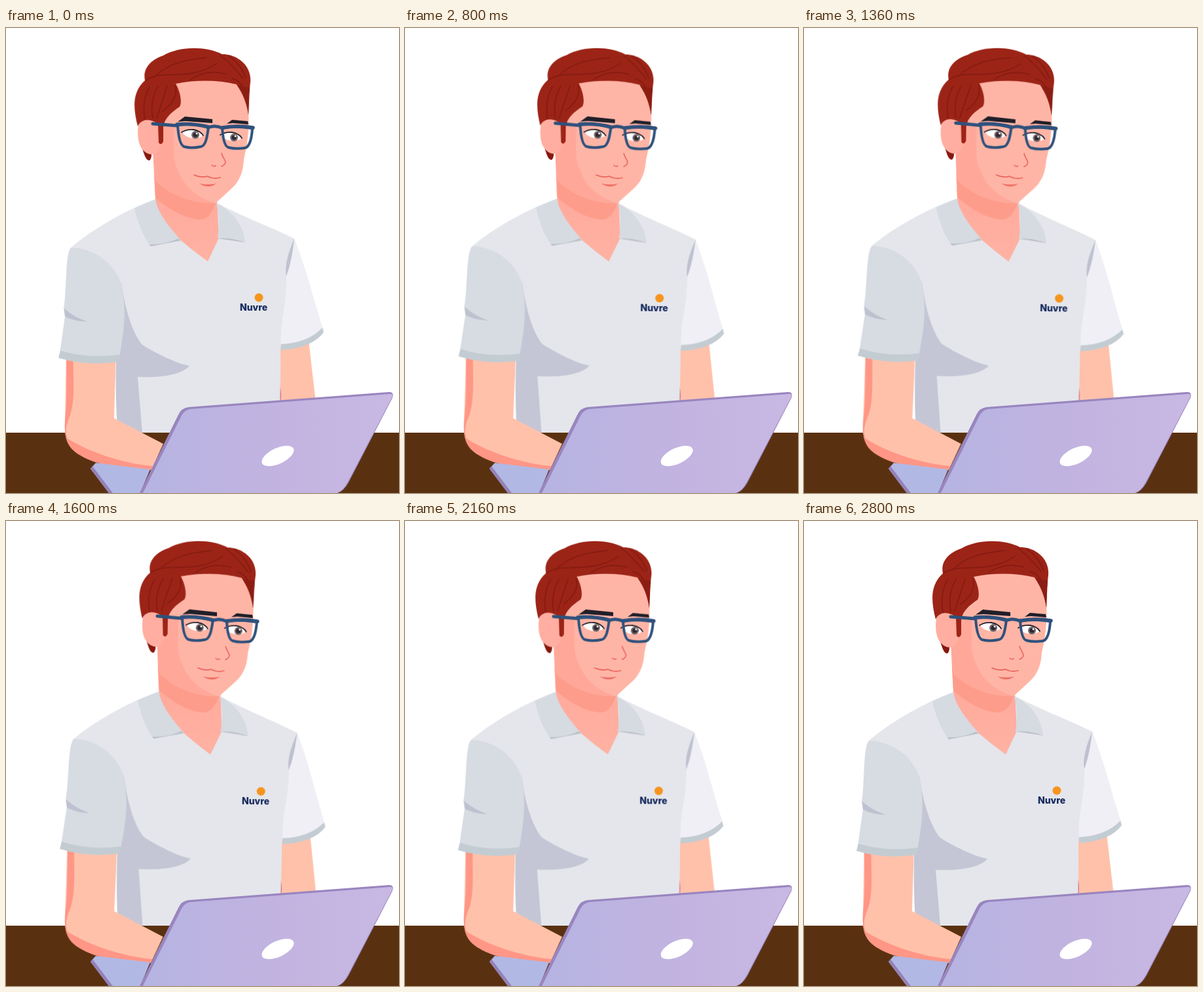
These frames come from a looping animation (600x709 px, 2880 ms). An HTML page without scripts:

```html
<!DOCTYPE html>
<html lang="pt">
<head>
<meta charset="utf-8">
<title>Working at a laptop</title>
<style>
  html, body { margin: 0; width: 100%; height: 100%; overflow: hidden; background: #fff; }
  svg { display: block; width: 100vw; height: 100vh; }
  .sway, .arm {
    transform-box: view-box;
    animation: lean 1440ms cubic-bezier(.37, 0, .63, 1) -120ms infinite alternate;
  }
  .sway { transform-origin: 300px 640px; }
  .arm { transform-origin: 130px 617px; animation-name: follow; }
  @keyframes lean { to { transform: rotate(.9deg); } }
  @keyframes follow { to { transform: skewX(-.9deg); } }
  .line { fill: none; stroke-linecap: round; stroke-linejoin: round; }
  .cuff { fill: #c3ccd2; }
  .fold { fill: #bfc1d0; }
  .collar { fill: #d6dae1; }
  .brand { font: 800 14px Inter, sans-serif; fill: #14275c; }
</style>
</head>
<body>
<svg viewBox="0 0 600 709">
  <defs>
    <linearGradient id="lidTone">
      <stop offset="0" stop-color="#b6b4e2"/>
      <stop offset=".55" stop-color="#c2b3e0"/>
      <stop offset="1" stop-color="#c8b8e3"/>
    </linearGradient>
    <linearGradient id="neckTone" x1="0" y1="0" x2="0" y2="1">
      <stop offset="0" stop-color="#ffa497"/>
      <stop offset="1" stop-color="#ffb2a3"/>
    </linearGradient>
    <g id="eye">
      <path d="M-16-4Q-9-9 1-8Q12-6 16 1Q9 6 0 5Q-11 4-16-4Z" fill="#fff"/>
      <circle cx="4" r="6" fill="#75696d"/>
      <circle cx="4" r="3.6" fill="#2e272d"/>
      <circle cx="6" cy="-2" r="1.4" fill="#fff"/>
      <path class="line" d="M-17-4Q-9-9 1-8Q12-6 16 1" stroke="#272029" stroke-width="1.8"/>
    </g>
  </defs>

  <g class="sway">
    <!-- right forearm -->
    <path d="M419 480L462 476L474 580H418Z" fill="#ffc1aa"/>
    <path d="M418 545Q422 558 418 580H416Z" fill="#d4708f"/>

    <!-- shirt -->
    <path d="M228 261C190 274 132 306 99 335L176 400L168 510L172 640H418L419 490L430 400L440 321C410 306 360 287 320 266Z" fill="#e4e6eb"/>
    <path d="M176 388C182 430 193 465 208 483C229 496 259 511 280 515C271 527 240 534 201 532L210 640H172C168 590 167 545 168 505Z" fill="#c5c6d5"/>
    <path d="M440 321C461 374 469 414 485 461Q463 485 420 486C417 452 429 420 428 378Q429 346 440 321Z" fill="#efeff5"/>
    <path class="fold" d="M440 321C430 344 425 364 428 378C434 362 438 341 440 321Z"/>
    <path class="cuff" d="M483 457Q461 480 420 482V491Q467 488 485 464Z"/>

    <!-- neck and collar -->
    <path d="M224 185L228 261C231 283 249 303 267 324Q287 341 308 356L325 320L322 262Z" fill="url(#neckTone)"/>
    <path d="M226 222L228 259C254 281 278 292 298 292Q313 290 320 266L270 235Z" fill="#fe9c8b"/>
    <path class="collar" d="M228 261L196 275Q204 311 221 333L267 324C249 303 231 283 228 261Z"/>
    <path class="collar" d="M321 267C346 279 363 302 365 327Q344 320 323 321Q328 293 321 267Z"/>
    <path d="M221 333L267 324L263 321Q242 331 219 330ZM365 327Q344 319 323 321Q345 324 365 327Z" fill="#bcc1c9"/>

    <!-- head -->
    <path d="M203 168L210 190Q214 203 219 202Q223 199 222 186Z" fill="#88180e"/>
    <path d="M240 90L256 68H350L370 122C372 158 367 184 363 200C362 222 355 235 344 245L320 267C286 268 252 256 228 233L224 178Z" fill="#ffb5a6"/>
    <path d="M233 145L256 148C257 175 253 197 262 216C272 243 293 259 320 267C284 268 252 256 228 233L224 178Z" fill="#ffa89a"/>
    <path d="M202 149C205 137 223 137 231 148L235 181C231 195 218 196 209 186C201 178 200 160 202 149Z" fill="#ffaea1"/>
    <path d="M212 80C208 61 222 48 240 42C264 28 304 27 330 40C354 40 375 58 373 82L371 101L370 132C367 112 361 100 352 86C322 79 290 79 259 85C266 97 269 113 265 120C252 129 242 137 240 151V173Q237 180 233 175L232 147C221 137 206 138 201 150C194 122 192 98 212 80Z" fill="#9c2417"/>
    <g class="line" stroke="#871c11" stroke-width="2">
      <path d="M213 80C238 62 278 83 322 54M226 75C248 54 270 49 306 45M281 79Q305 62 335 70M327 42Q340 50 362 77M340 43Q357 53 366 76M345 77Q358 79 368 101"/>
      <path d="M219 90Q207 112 212 139M232 89Q219 111 224 138M246 88Q238 112 230 138M258 87Q264 109 239 127"/>
    </g>
    <path d="M352 86Q362 91 372 90L370 132C367 112 361 100 352 86Z" fill="#8c1d12"/>

    <!-- face -->
    <g fill="#201f29">
      <path d="M262 143L273 135L315 139V145L274 142Z"/>
      <path d="M337 146L345 140L369 142L370 147L346 145Z"/>
    </g>
    <use href="#eye" x="285" y="163"/>
    <use href="#eye" x="344" y="167"/>
    <g class="line" stroke="#2f517c" stroke-width="4">
      <path d="M224 146L262 149M308 152Q319 147 331 153" stroke-width="5"/>
      <path d="M262 148Q285 145 309 151C307 166 305 180 297 181Q283 184 272 181C266 179 263 165 262 148Z"/>
      <path d="M330 152Q354 149 376 153C375 168 372 182 364 183Q350 185 339 182C334 180 331 168 330 152Z"/>
      <path d="M261 147Q286 145 309 151M330 152Q355 148 377 152" stroke-width="5.5"/>
    </g>
    <path class="line" d="M329 191C331 200 341 205 329 211M314 209Q317 212 320 210M287 224Q299 229 307 226Q317 231 327 228" stroke="#e9635b" stroke-width="1.6"/>
    <path d="M295 237Q308 240 321 237Q309 246 295 237Z" fill="#ed6c65"/>

    <circle cx="386" cy="411" r="6.5" fill="#f7941d"/>
    <text class="brand" x="357" y="431">Nuvre</text>
  </g>

  <path d="M0 617H600V709H0Z" fill="#5a3110"/>

  <g class="arm">
    <path d="M92 490H168L165 595L240 634L222 674C180 672 139 666 114 651C91 638 89 620 90 598Z" fill="#ffc1aa"/>
    <path d="M92 490H103C101 530 108 570 95 598C91 610 91 618 94 626C133 650 182 664 224 668L222 674C180 673 139 667 114 652C90 639 89 620 90 598C94 565 92 530 92 490Z" fill="#ff9686"/>
  </g>

  <g class="sway">
    <path d="M99 335C140 336 169 364 177 394C185 438 178 472 173 503Q126 512 82 497L90 439L88 429C93 399 90 344 99 335Z" fill="#d7dbe2"/>
    <path class="fold" d="M89 428Q104 441 125 448Q103 447 90 440Z"/>
    <path class="cuff" d="M83 492Q126 505 174 498L172 509Q123 516 80 503Z"/>
  </g>

  <!-- laptop -->
  <path d="M129 672L137 663L220 673L205 709H157Z" fill="#b2b8e4"/>
  <path d="M129 672L132 668L163 709H157Z" fill="#9482b8"/>
  <path d="M204 709L263 590Q268 579 279 578L585 555Q593 555 590 564L523 693Q515 707 506 709Z" fill="#9985bf"/>
  <path d="M209 709L268 591Q273 582 282 581L586 558Q592 557 589 564L522 692Q514 707 505 709Z" fill="url(#lidTone)"/>
  <ellipse cx="415" cy="652.5" rx="26.5" ry="12" transform="rotate(-25 415 652.5)" fill="#fff"/>
</svg>
</body>
</html>
```
